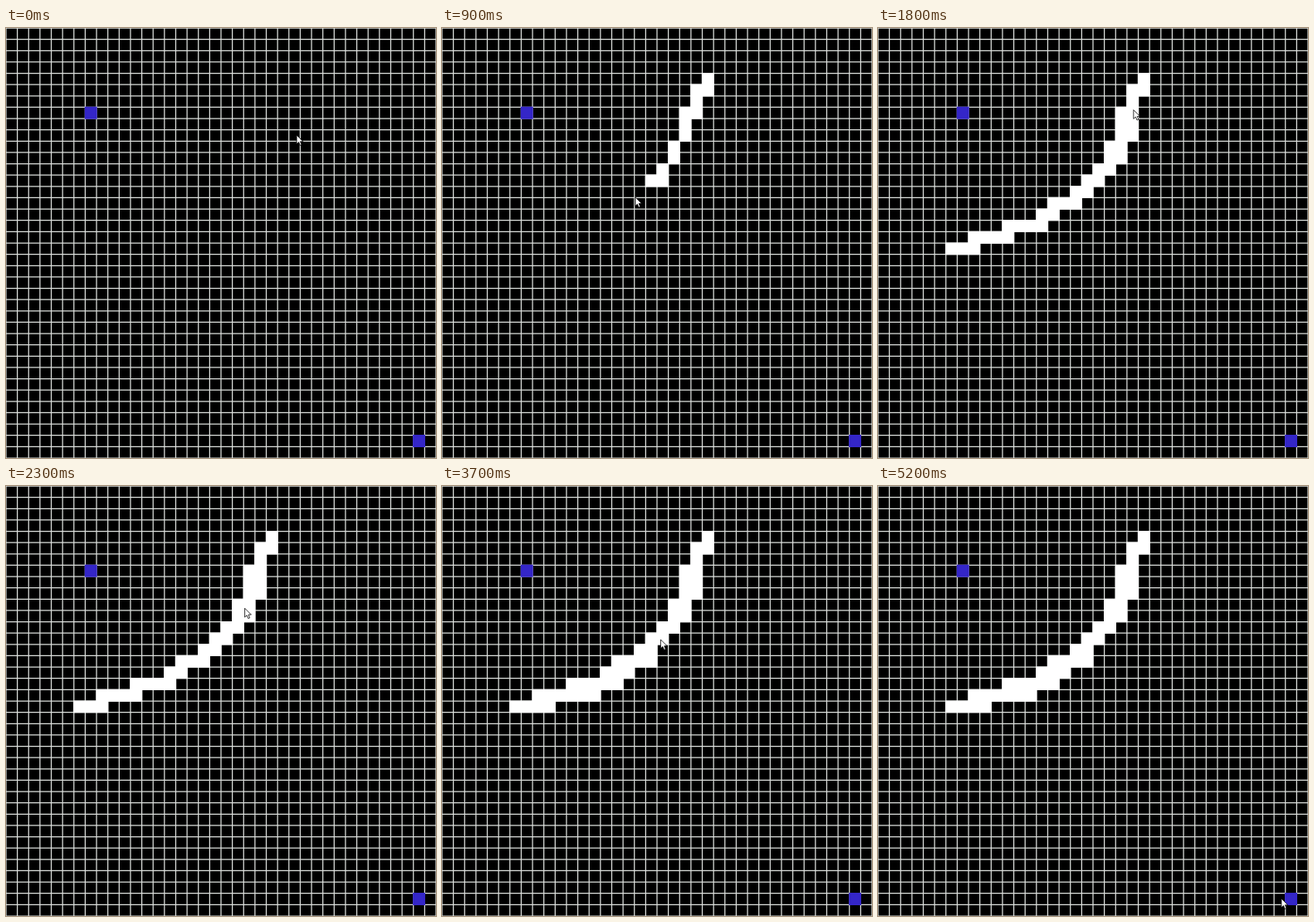
An HTML page that plays this animation: 518x518 px, repeating every 5300 ms.

```html
<!DOCTYPE html>
<html lang="en">
<head>
<meta charset="utf-8">
<title>Grid drawing</title>
<style>
  html, body { margin: 0; width: 100%; height: 100%; overflow: hidden; background: #000; }
  svg { display: block; width: 100vw; height: 100vh; }
</style>
</head>
<body>
<svg viewBox="0 0 518 518">
  <rect width="518" height="518" fill="#000"/>
  <path id="grid" fill="none" stroke="#dcdfdc" stroke-width="1.25"/>
  <path id="marks" fill="#3426c8" stroke="#3426c8" stroke-width="1.25"/>
  <path id="ink" fill="#fff" stroke="#fff" stroke-width="1.25"/>
  <path id="cursor" d="M0 0V10.8L2.5 8.5L4.2 12.4L6 11.6L4.4 7.8H7.8Z"
        fill="#fff" stroke="#000" stroke-width=".8"/>
</svg>
<script>
const LOOP = 5300, STEP = 100, N = 38, CELL = 518 / N;
const LAG = 0.6, LEAVE = 42, LAST = 52;
const $ = id => document.getElementById(id);
const lerp = (a, b, p) => a + (b - a) * p;
const box = (c, r) => `M${c * CELL} ${r * CELL}h${CELL}v${CELL}h${-CELL}z`;

// The drawn curve in cell units: [y, x]
const knots = [
  [4, 23.6], [10, 21], [12, 20], [14, 18.5], [15, 17], [17, 14], [18, 11.8], [19.8, 6.2]
];

// Hand moves along the curve: [step, y, x offset from the curve, pen down until the next key]
const keys = [
  [0, 9.46, 4.45, 0], [3, 4, 0, 1], [6, 8.88, 0, 1], [11.4, 19.8, 0, 0],
  [12, 19.6, 0, 1], [14, 17.6, -0.36, 1], [14.5, 16.8, 0.23, 1], [17.6, 8.05, 0.66, 0],
  [19, 5.2, -0.3, 0], [23, 10.8, 0.5, 0], [24, 12.1, 0, 1], [28.5, 19.3, 0.3, 0],
  [30, 19.15, 0.14, 0], [30.5, 19.2, 1.2, 1], [36, 15.05, 1.25, 0],
  [37, 13.57, 0.5, 0], [LEAVE, 10.05, 0.6, 0]
];

// Piecewise linear value of column n at key v
function along(list, v, n) {
  let i = list.findIndex(k => k[0] >= v);
  if (i < 0) i = list.length - 1;
  i = Math.max(1, i);
  const a = list[i - 1], b = list[i];
  return lerp(a[n], b[n], (v - a[0]) / (b[0] - a[0]));
}
const curve = y => along(knots, y, 1);

function pointer(s) {
  const t = Math.min(s, LEAVE), y = along(keys, t, 1), x = curve(y) + along(keys, t, 2);
  const p = (s - t) / (LAST - LEAVE);
  return [lerp(x, 35.65, p), lerp(y, 36.46, p * (2 - p))];
}

// Every cell the pen has crossed up to step s
function inked(s) {
  const cells = new Set();
  for (let i = 0; i < keys.length - 1; i++) {
    const [t0, y0, d0, pen] = keys[i], [t1, y1, d1] = keys[i + 1];
    if (!pen || s <= t0) continue;
    const end = lerp(y0, y1, Math.min(1, (s - t0) / (t1 - t0)));
    const lo = Math.min(y0, end), hi = Math.max(y0, end);
    const x = y => curve(y) + lerp(d0, d1, (y - y0) / (y1 - y0));
    for (let r = Math.floor(lo); r < hi; r++) {
      const first = Math.floor(x(Math.min(r + 1, hi)) + 1e-6);
      const last = Math.ceil(x(Math.max(r, lo)) - 1e-6);
      for (let c = first; c < last; c++) cells.add(box(c, r));
    }
  }
  return [...cells].join("");
}

function draw(t) {
  const s = Math.floor(t % LOOP / STEP);
  $("ink").setAttribute("d", inked(s - LAG));
  $("cursor").setAttribute("transform", `translate(${pointer(s).map(v => v * CELL)})`);
}

let lines = "";
for (let i = 0; i <= N; i++) lines += `M${i * CELL} 0V518M0 ${i * CELL}H518`;
$("grid").setAttribute("d", lines);
$("marks").setAttribute("d", box(7, 7) + box(36, 36));

const start = performance.now();
function tick() {
  draw(performance.now() - start);
  requestAnimationFrame(tick);
}
tick();
</script>
</body>
</html>
```
